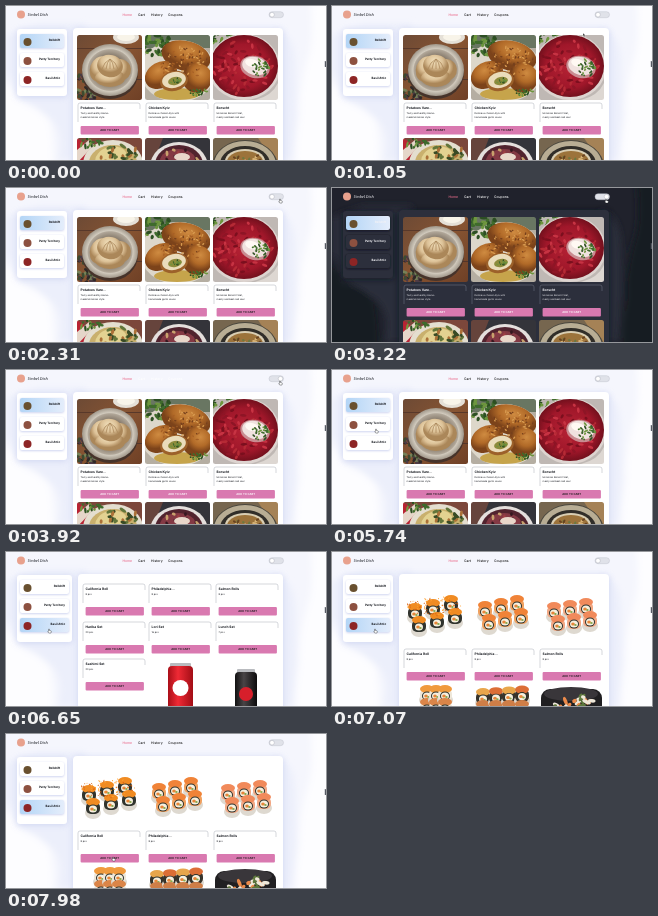
An HTML page that plays this animation: 320 by 154 pixels, repeating every 8 s.

```html
<!DOCTYPE html>
<html lang="en">
<head>
<meta charset="utf-8">
<title>Food delivery</title>
<style>
html, body { margin: 0; width: 100%; height: 100%; overflow: hidden; }
svg { display: block; width: 100vw; height: 100vh; font-family: Inter, "Open Sans", sans-serif; text-rendering: geometricPrecision;
  --page: #f5f6fd; --wave: #eceffb; --blob: #fdfdff; --panel: #fff; --ink: #171a20; --line: #b9bcc4; --glow: #c6cdee; }
svg.dark { --page: #20222c; --wave: #2a2d3b; --blob: #191b23; --panel: #2c2f3c; --ink: #f2f2f6; --line: #686c7c; --glow: #11131b; }
.ink { fill: var(--ink); }
.soft { fill: var(--soft); }
.title { font-size: 3.3px; font-weight: 700; }
.text { font-size: 2.4px; }
.nav { font-size: 3.4px; font-weight: 500; }
.buy { font-size: 2.75px; font-weight: 600; text-anchor: middle; }
.shop { font-size: 3px; font-weight: 700; text-anchor: end; }
.logo { font: italic 3.8px "Noto Serif", serif; }
</style>
</head>
<body>
<svg id="stage" viewBox="0 0 320 154" preserveAspectRatio="none">
  <defs>
    <clipPath id="photo"><rect width="65" height="65" rx="2.5"/></clipPath>
    <linearGradient id="active"><stop stop-color="#b3d5f6"/><stop offset="1" stop-color="#e4edfb"/></linearGradient>
    <linearGradient id="red"><stop stop-color="#a90f18"/><stop offset=".4" stop-color="#ef2a35"/><stop offset="1" stop-color="#a20d15"/></linearGradient>
    <linearGradient id="black"><stop stop-color="#111"/><stop offset=".4" stop-color="#484446"/><stop offset="1" stop-color="#0c0b0c"/></linearGradient>
    <linearGradient id="wood" x2="1" y2="1"><stop stop-color="#6d4a35"/><stop offset=".5" stop-color="#875432"/><stop offset="1" stop-color="#6f4026"/></linearGradient>
    <radialGradient id="plate"><stop offset=".55" stop-color="#877b6c"/><stop offset=".78" stop-color="#b0a698"/><stop offset=".82" stop-color="#d0c9bc"/><stop offset="1" stop-color="#a0978a"/></radialGradient>
    <radialGradient id="dough" cx=".42" cy=".3"><stop stop-color="#f3e3bf"/><stop offset=".6" stop-color="#dcc197"/><stop offset="1" stop-color="#ab8759"/></radialGradient>
    <radialGradient id="crust" cy=".3"><stop stop-color="#cf8b41"/><stop offset=".6" stop-color="#b16a28"/><stop offset="1" stop-color="#7c431a"/></radialGradient>
    <radialGradient id="beet"><stop stop-color="#b62335"/><stop offset=".7" stop-color="#a0172a"/><stop offset="1" stop-color="#73101d"/></radialGradient>
    <filter id="blur" x="-20%" y="-20%" width="140%" height="140%"><feGaussianBlur stdDeviation="3"/></filter>
    <filter id="fine" x="-10%" y="-20%" width="120%" height="150%"><feGaussianBlur stdDeviation=".8"/></filter>
    <filter id="lens"><feGaussianBlur stdDeviation=".45"/></filter>
  </defs>
  <rect width="320" height="154" fill="var(--page)"/>
  <g filter="url(#blur)">
    <path fill="var(--wave)" d="M0 30Q12 24 32 18H80V154H52Q60 120 38 108Q16 98 8 84Q5 70 0 66Z"/>
    <path fill="var(--blob)" d="M-8 74Q8 78 10 94Q34 100 44 116Q48 136 47 160H-8Z"/>
    <path fill="var(--wave)" d="M268 22Q289 26 289 60Q291 110 286 154H268Z"/>
    <path fill="var(--blob)" d="M328 -8H304Q308 30 303 48Q292 84 294 110Q288 140 290 162H328Z"/>
  </g>
  <circle cx="15" cy="8.5" r="4" fill="#e8a18d"/>
  <text class="logo ink" x="21.5" y="9.8">Umbel Dish</text>
  <g class="nav">
    <text x="116.5" y="10" fill="#ea6d8c">Home</text>
    <text class="soft" x="132" y="10">Cart</text>
    <text class="soft" x="145" y="10">History</text>
    <text class="soft" x="162" y="10">Coupons</text>
  </g>
  <rect x="263" y="5.7" width="14.5" height="6" rx="3" fill="#e0e2e9" stroke="#b9bcc6" stroke-width=".4"/>
  <circle id="knob" cy="8.7" r="2.3" fill="#fff" stroke="#a5a8b2" stroke-width=".4"/>
  <g id="views"></g>
  <rect x="318.8" y="55" width="1.2" height="6" rx=".6" fill="#555963"/>
  <g id="cursor" stroke-width=".5" stroke-linejoin="round">
    <path id="arrow" fill="#222" stroke="#fff" d="M0 0V4.5L1.1 3.5L1.9 5L2.7 4.6L2 3.2H3.4Z"/>
    <path id="hand" fill="#fff" stroke="#15161a" d="M-.6 .2Q0-.5.6 .2V2L2.8 2.5Q3.3 2.8 3.1 3.7L2.6 5.4H-.3L-1.7 3.3Q-1.3 2.6-.6 3.1Z"/>
  </g>
</svg>
<script>
const LOOP = 8000, DARK_ON = 2520, DARK_OFF = 3920, PICK = 6580, LOADED = 6930, FADE = 420;
const COLUMNS = [71, 139, 207], SPARSE_COLUMNS = [76, 142, 209];
const SHOPS = [["Rolldrift", "#69502f"], ["Patty Territory", "#8d5140"], ["Basil Attic", "#8d2525"]];
const find = id => document.getElementById(id);

const oval = (x, y, rx, ry, fill, turn = 0) =>
  `<ellipse cx="${x}" cy="${y}" rx="${rx}" ry="${ry}" fill="${fill}" transform="rotate(${turn} ${x} ${y})"/>`;
const box = (x, y, w, h, fill, r = 0, more = "") =>
  `<rect x="${x}" y="${y}" width="${w}" height="${h}" rx="${r}" fill="${fill}" ${more}/>`;
const shape = (d, fill) => `<path d="${d}" fill="${fill}"/>`;
const text = (x, y, name, words) => `<text x="${x}" y="${y}" class="${name}">${words}</text>`;

function scatter(count, x, y, rx, ry, size, colors, seed) {
  const random = () => (seed = (seed * 16807) % 2147483647) / 2147483647;
  let out = "";
  for (let i = 0; i < count; i++) {
    const a = random() * Math.PI * 2, d = Math.sqrt(random());
    out += oval(x + Math.cos(a) * d * rx, y + Math.sin(a) * d * ry,
      size * (.6 + random()), size * .6, colors[i % colors.length], random() * 180);
  }
  return out;
}

const greens = ["#3f6b2c", "#6e963f", "#2d4f23"];
const pleats = (x, y) => [-2, -1, 0, 1, 2].map(i =>
  `<path d="M${x} ${y}q${i * 3} 3 ${i * 4} 10" fill="none" stroke="#ad8a5d" stroke-width=".8"/>`).join("");

const dishes = [
  box(0, 0, 65, 65, "url(#wood)") + box(0, 13, 65, 1, "#58382a") + box(0, 44, 65, 1, "#53352a") +
    oval(49, 2, 13, 7, "#e5e0d7") + oval(49, 2, 9, 4, "#f8f4e9") +
    scatter(45, 5, 54, 16, 14, 2.4, ["#3d4a30", "#4d3b46", "#2f2927", "#758158"], 17) +
    oval(33, 38, 28, 26, "#46332a") + oval(33, 35, 28, 26, "url(#plate)") +
    oval(23, 34, 10, 13, "url(#dough)", 20) + oval(43, 35, 11, 11, "url(#dough)", -25) +
    oval(33, 43, 15, 9, "url(#dough)") + oval(33, 31, 13, 11, "url(#dough)", 15) + pleats(33, 24),
  box(0, 0, 65, 65, "#b5aea2") + box(0, 0, 65, 13, "#697662") + oval(33, 36, 38, 31, "#ddd7ca") +
    scatter(42, 11, 11, 18, 12, 2.7, greens, 31) + oval(32, 59, 23, 6, "#c6a44b") +
    oval(41, 21, 25, 15, "url(#crust)", 15) + oval(16, 40, 17, 13, "url(#crust)", -30) +
    oval(52, 43, 15, 15, "url(#crust)", 35) +
    scatter(85, 38, 27, 25, 17, 1.2, ["#d89b50", "#a65f25", "#75401d"], 43) +
    oval(29, 46, 14, 10, "#9c612a", -12) + oval(29, 45, 12, 8, "#eadcbb", -12) +
    oval(30, 46, 7, 4, "#8d8b3c", -12) + scatter(14, 30, 46, 6, 3, 1, greens, 12) +
    scatter(18, 52, 57, 10, 4, 1.5, greens, 8),
  box(0, 0, 65, 65, "#bfb8b4") + scatter(25, 5, 4, 15, 9, 2.5, greens, 73) +
    oval(31, 32, 36, 33, "#ddd4d0") + oval(31, 31, 34, 31, "url(#beet)") +
    scatter(80, 29, 32, 30, 27, 2.2, ["#c73343", "#7b0f1e", "#b52a35", "#8e1526"], 91) +
    oval(42, 32, 15, 11, "#c98c91", 15) + oval(42, 31, 13, 9, "#f0e2df", 15) + oval(39, 28, 7, 4, "#fff9f3", 15) +
    scatter(28, 48, 33, 9, 9, 1.5, greens, 11) + shape("M65 48V65H42Q59 61 65 48", "#ddd7d2"),
  box(0, 0, 65, 65, "#7c473b") + shape("M0 0L14 10L8 65H0Z", "#b82333") + shape("M0 12L12 2L17 7L0 25Z", "#e5d6c9") +
    oval(36, 26, 30, 24, "#e4decf") + oval(36, 25, 24, 18, "#c9b06d") + oval(34, 20, 16, 11, "#e3d291", -15) +
    scatter(30, 42, 18, 19, 14, 2.5, ["#62753a", "#ab7138", "#394b25"], 6) + scatter(16, 13, 5, 12, 5, 2, greens, 22),
  box(0, 0, 65, 65, "#34343a") + shape("M0 0H18L7 28L0 30Z", "#66443c") + oval(34, 29, 29, 25, "#e4dfdc") +
    oval(34, 27, 24, 20, "#51232e") + oval(33, 23, 18, 12, "#843944") +
    scatter(26, 33, 23, 20, 13, 2.4, ["#9c3d43", "#35171f", "#c8a16d"], 37) + oval(37, 19, 8, 4, "#e9d7ca"),
  box(0, 0, 65, 65, "#76664f") + shape("M45 0H65V30Z", "#a58256") + oval(32, 29, 33, 27, "#4a473e") +
    oval(32, 27, 31, 24, "#b8ad94") + oval(32, 26, 25, 18, "#312e29") + oval(32, 23, 20, 12, "#d9ceb3") +
    oval(32, 24, 18, 11, "#9c733b") + scatter(26, 32, 23, 16, 9, 1.8, ["#d8b477", "#684320", "#6c7940"], 29)
];

const roll = (x, y, top, side = "#eee7d9") =>
  oval(x, y + 8, 8, 6, "#ded9d0") + box(x - 7, y - 3, 14, 12, side, 5) +
  oval(x, y - 3, 7, 4, top) + oval(x, y + 4, 5, 4.5, "#2c322d") + oval(x, y + 4, 4, 3.6, "#f7f0df") +
  oval(x - 1, y + 4, 1.8, 1.5, "#e88538") + oval(x + 1.4, y + 5, 1.3, 1, "#88a84d");
const rolls = (x, y, dx, dy, top, side) =>
  [0, 1, 2].map(i => roll(x + i * dx, y - i * dy, top, side)).join("") +
  [0, 1, 2].map(i => roll(x + 4 + i * dx, y + 13 - i * dy, top, side)).join("");

const sushi = [
  rolls(12, 29, 18, 4, "#f08b22", "#33352f") + scatter(70, 31, 25, 27, 10, .8, ["#ff9e2d", "#d86312"], 53),
  rolls(14, 27, 16, 3, "#f08338", "#f0a05e"),
  rolls(15, 28, 16, 2, "#f18a5b", "#f2a884"),
  [0, 1, 2].map(i => roll(24 + i * 9, 8, "#f09a3d") + roll(24 + i * 9, 21, "#db8548")).join(""),
  [0, 1, 2, 3].map(i => roll(12 + i * 13, 11 - i * .8, i % 2 ? "#dc6e36" : "#e8a64b", "#39342b") + roll(12 + i * 13, 23, "#cf7e47")).join(""),
  box(2, 5, 61, 30, "#201f21", 9) + oval(32, 10, 27, 7, "#39363a") +
    scatter(20, 32, 18, 24, 6, 3, ["#ec8a4a", "#efe8d9", "#5d773c"], 12)
];

const photo = (x, y, art) => `<g transform="translate(${x} ${y})" clip-path="url(#photo)"><g filter="url(#lens)">${art}</g></g>`;

function info(x, y, title, lines) {
  return `<path fill="none" stroke="var(--line)" stroke-width=".6" d="M${x + 1} ${y + 19}V${y + 2}q0-2 2-2H${x + 61}q2 0 2 2V${y + 6}"/>` +
    text(x + 3.6, y + 6.1, "title ink", title) +
    lines.map((line, i) => text(x + 3.6, y + 11 + i * 4.4, "text ink", line)).join("") +
    box(x + 3.6, y + 23, 58.3, 8.6, "#d979b0", 1) + text(x + 32.7, y + 28.4, "buy soft", "ADD TO CART");
}

const glow = (x, y, w, h, r) =>
  box(x, y + 1, w, h, "var(--glow)", r, 'filter="url(#blur)" opacity=".75"') + box(x, y, w, h, "var(--panel)", r);

function sidebar(width, active) {
  return glow(11, 23, width, 67, 3) + SHOPS.map(([name, color], i) => {
    const y = 28 + i * 19;
    return box(14, y + .7, width - 6, 14, "var(--glow)", 2, 'filter="url(#fine)"') +
      box(14, y, width - 6, 14, i === active ? "url(#active)" : "var(--panel)", 2) +
      oval(21.5, y + 8, 4, 4, color) + text(width + 4.2, y + 7.4, "shop ink", name);
  }).join("");
}

const grid = (items, art) => glow(67, 22, 210, 145, 4) +
  art.map((picture, i) => photo(COLUMNS[i % 3], i < 3 ? 29 : 132, picture)).join("") +
  items.map(([title, ...lines], i) => info(COLUMNS[i], 97, title, lines)).join("");

const can = (x, y, w, fill, mark) =>
  box(x + 2, y, w - 4, 5, "#b9bbbf", 1) + box(x, y + 3, w, 50, `url(#${fill})`, 4) +
  oval(x + w / 2, y + 25, w * .32, w * .32, mark);

const meals = [
  ["Potatoes Vare...", "Tasty and healthy Home-", "made Ukrainian style"],
  ["Chicken Kyiv", "Delicious chicken Kyiv with", "homemade garlic sauce"],
  ["Borscht", "Ukrainian Borscht! Hot,", "meaty and beet-red sour"]
];
const sets = [
  ["California Roll", "8 pcs"], ["Philadelphia ...", "8 pcs"], ["Salmon Rolls", "8 pcs"],
  ["Hariba Set", "20 pcs"], ["Lori Set", "16 pcs"], ["Lunch Set", "7 pcs"], ["Sashimi Set", "20 pcs"]
];
const views = [
  sidebar(50, 0) + grid(meals, dishes),
  sidebar(55, 2) + glow(72, 22, 205, 145, 4) +
    sets.map(([title, ...lines], i) => info(SPARSE_COLUMNS[i % 3], [32, 70, 107][Math.floor(i / 3)], title, lines)).join("") +
    can(162, 111, 25, "red", "#fff") + can(229, 117, 22, "black", "#d71f2b"),
  sidebar(50, 2) + grid(sets.slice(0, 3), sushi)
];
find("views").innerHTML = views.map(view => `<g>${view}</g>`).join("");

// time, x, y
const path = [
  [0, 321, 58], [840, 251, 27], [1120, 251, 27], [1680, 262, 18], [2240, 274, 11], [3920, 274, 11],
  [4690, 60, 48], [5250, 44, 59], [5950, 44, 59], [6440, 43, 77], [7350, 43, 77], [7910, 107, 123], [LOOP, 107, 123]
];
const clamp = n => Math.max(0, Math.min(1, n));
const ease = n => n * n * (3 - 2 * n);

function pointer(time) {
  const i = Math.max(1, path.findIndex(step => step[0] > time));
  const [a, b] = [path[i - 1], path[i]], n = ease((time - a[0]) / (b[0] - a[0]));
  return [a[1] + (b[1] - a[1]) * n, a[2] + (b[2] - a[2]) * n];
}

function draw(now) {
  const time = now % LOOP, stage = find("stage");
  const night = clamp((time - DARK_ON) / FADE) - clamp((time - DARK_OFF) / FADE);
  const shade = Math.round(24 + 231 * ease(night));
  stage.classList.toggle("dark", time >= DARK_ON && time < DARK_OFF);
  stage.style.setProperty("--soft", `rgb(${shade},${shade},${shade})`);
  find("knob").setAttribute("cx", 266 + 8.5 * ease(night));
  const current = time < PICK ? 0 : time < LOADED ? 1 : 2;
  [...find("views").children].forEach((view, i) => view.style.display = i === current ? "" : "none");

  const [x, y] = pointer(time);
  const overLink = (x > 262 && x < 279 && y < 13) || (x < 60 && y > 46) || (x < 134 && y > 119);
  find("cursor").setAttribute("transform", `translate(${x} ${y}) scale(.75)`);
  find("hand").style.display = overLink ? "" : "none";
  find("arrow").style.display = overLink ? "none" : "";
}

const start = performance.now();
function tick() {
  draw(performance.now() - start);
  requestAnimationFrame(tick);
}
tick();
</script>
</body>
</html>
```
